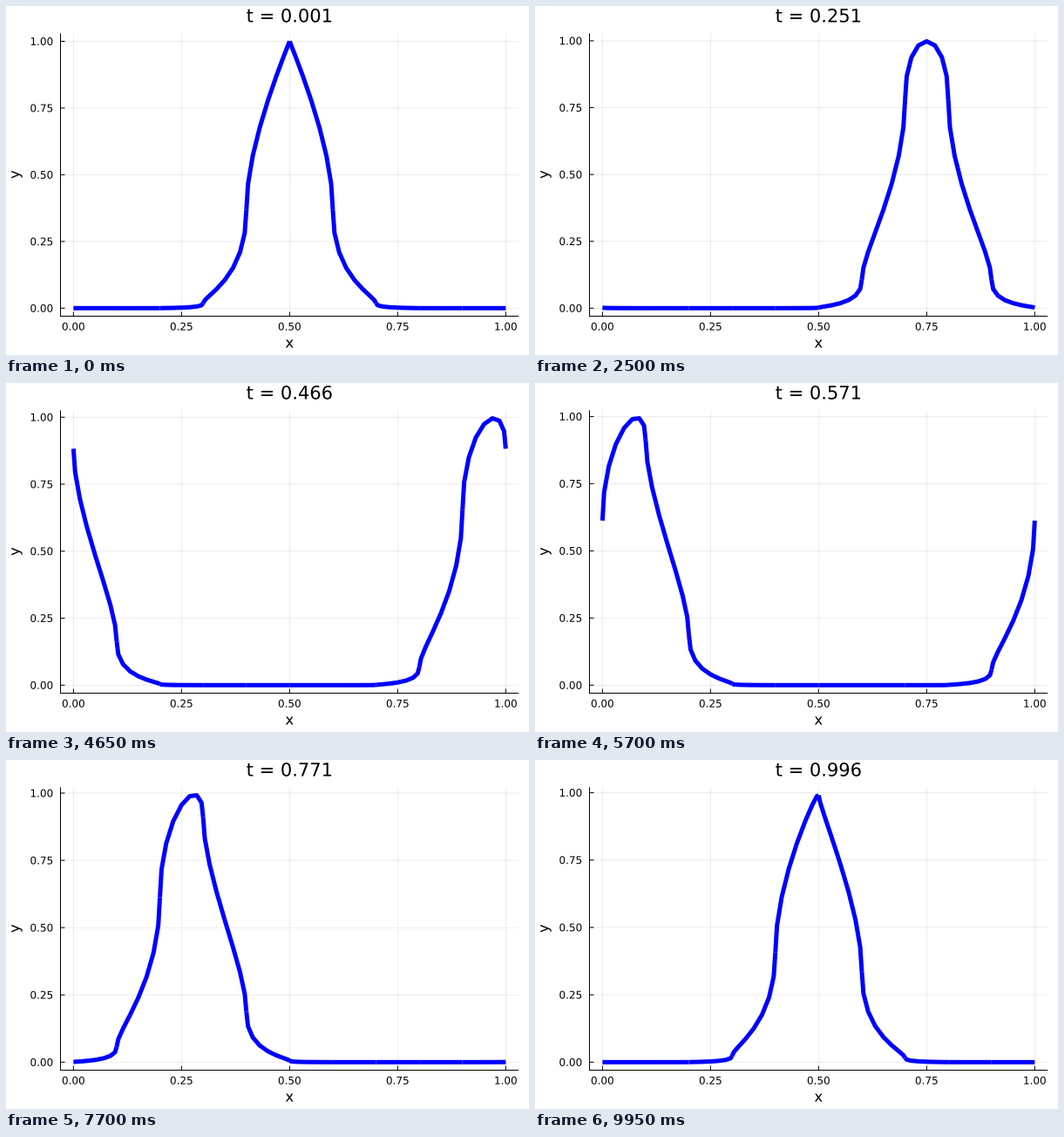
A matplotlib script that plays this animation: 600x400 px, repeating every 10 s.

```python
import numpy as np
import matplotlib.pyplot as plt
from matplotlib.animation import FuncAnimation
from matplotlib.patches import PathPatch
from matplotlib.textpath import TextPath
from matplotlib.transforms import Affine2D

W, H, DPI = 600, 400, 100
FRAMES, INTERVAL = 200, 50
LEFT, RIGHT, BOTTOM, TOP = 62.5, 588.2, 44.5, 368.7  # plot area, y upwards
PAD = 0.03 / 1.06
TICKS = [0, 0.25, 0.5, 0.75, 1]
TICK_LEN = 5
CELLS, ORDER = 10, 8

fig = plt.figure(figsize=(W / DPI, H / DPI), dpi=DPI, facecolor="white")
ax = fig.add_axes([0, 0, 1, 1])
ax.set_xlim(0, W)
ax.set_ylim(0, H)
ax.axis("off")


def px(x):
    span = RIGHT - LEFT
    return LEFT + span * (PAD + x / 1.06)


def py(y, lo, hi):
    span = TOP - BOTTOM
    return BOTTOM + span * (PAD + (y - lo) / (hi - lo) / 1.06)


def glyphs(text, size):
    return TextPath((0, 0), text, size=size, prop={"family": "DejaVu Sans"})


def place(patch, x, y, angle=0):
    patch.set_transform(Affine2D().rotate_deg(angle).translate(x, y) + ax.transData)


def label(text, size, x, y, angle=0):
    patch = PathPatch(glyphs(text, size), fc="black", lw=0, zorder=3)
    ax.add_patch(patch)
    place(patch, x, y, angle)
    return patch


def stroke(xs, ys, width, **style):
    line, = ax.plot(xs, ys, lw=width * 72 / DPI, solid_capstyle="butt",
                    snap=False, **style)
    return line


def grid(xs, ys):
    return stroke(xs, ys, 0.8, color="black", alpha=0.09, zorder=1)


def axis_line(xs, ys):
    return stroke(xs, ys, 1, color="black", zorder=2)


# Static parts: axes, x ticks and names
axis_line([LEFT, LEFT], [BOTTOM - 0.5, TOP])
axis_line([LEFT - 0.5, RIGHT], [BOTTOM, BOTTOM])
for tick in TICKS:
    x = px(tick)
    grid([x, x], [BOTTOM, TOP])
    axis_line([x, x], [BOTTOM, BOTTOM + TICK_LEN])
    label(f"{tick:.2f}", 12, x - 13.4, 28.4)
label("x", 16.5, 320.4, 8.5)
label("y", 16.5, 15.3, 202, 90)
title = label("t = 0.001", 21, 275.7, 381.5)

# Parts that follow the vertical scale
y_ticks = [(tick, grid([], []), axis_line([], []),
            label(f"{tick:.2f}", 12, 27.5, 0)) for tick in TICKS]

# Values sit on even nodes but are drawn at Chebyshev positions
steps = np.arange(ORDER + 1)
starts = np.arange(CELLS)[:, None] / CELLS
nodes = starts + steps / ORDER / CELLS
drawn_x = starts + (1 - np.cos(np.pi * steps / ORDER)) / 2 / CELLS
curves = [stroke([], [], 5, color="blue", zorder=4, solid_joinstyle="round")
          for _ in range(CELLS)]


def wave(t):
    """Periodic Gaussian pulse, slowly spreading as it travels."""
    dist = (nodes - t) % 1 - 0.5
    spread = 1 + 0.015 * t
    return np.exp(-100 * dist ** 2 / spread) / np.sqrt(spread)


def draw(i):
    t = 0.005 * i
    u = wave(t)
    lo, hi = u.min(), u.max()
    for curve, xs, ys in zip(curves, drawn_x, u):
        curve.set_data(px(xs), py(ys, lo, hi))
    for tick, rule, mark, text in y_ticks:
        y = py(tick, lo, hi)
        rule.set_data([LEFT, RIGHT], [y, y])
        mark.set_data([LEFT, LEFT + TICK_LEN], [y, y])
        place(text, 27.5, y - 4.4)
    title.set_path(glyphs(f"t = {t + 0.001:.3f}", 21))
    return []


anim = FuncAnimation(fig, draw, frames=FRAMES, interval=INTERVAL,
                     init_func=lambda: draw(0), repeat=True, repeat_delay=0)
plt.show()
```
